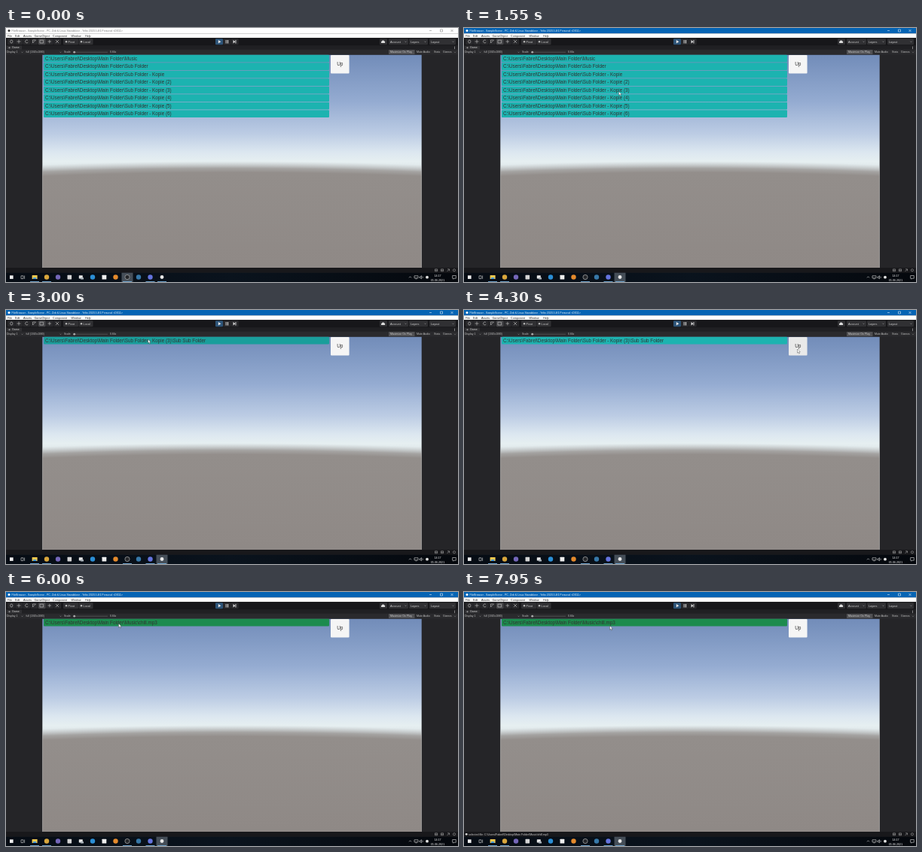
Write an HTML page that moves like this. It is 600 px wide and 338 px high and loops after 8 s.

```html
<!DOCTYPE html>
<html lang="en">
<head>
<meta charset="utf-8">
<title>File browser</title>
<style>
  html, body { margin: 0; width: 100%; height: 100%; overflow: hidden; background: #252528; }
  svg { display: block; width: 100vw; height: 100vh; }
  text { font-family: "Liberation Sans", Arial, sans-serif; white-space: pre; }
</style>
</head>
<body>
<svg id="stage" viewBox="0 0 600 338">
  <defs>
    <linearGradient id="sky" x1="0" y1="36" x2="0" y2="190" gradientUnits="userSpaceOnUse">
      <stop offset="0" stop-color="#728cb9"/>
      <stop offset=".4" stop-color="#94abd1"/>
      <stop offset=".68" stop-color="#bccce4"/>
      <stop offset=".84" stop-color="#dce7f0"/>
      <stop offset=".92" stop-color="#e6eff1"/>
      <stop offset="1" stop-color="#dbe3e5"/>
    </linearGradient>
    <radialGradient id="ground" cx="300" cy="6537" r="6360" gradientUnits="userSpaceOnUse">
      <stop offset=".9784" stop-color="#8f8986"/>
      <stop offset=".9976" stop-color="#938e8b"/>
      <stop offset=".9985" stop-color="#9b9896" stop-opacity=".85"/>
      <stop offset="1" stop-color="#b9bcbe" stop-opacity="0"/>
    </radialGradient>
    <linearGradient id="taskbar">
      <stop offset="0" stop-color="#060c14"/>
      <stop offset=".5" stop-color="#0a131d"/>
      <stop offset="1" stop-color="#05080d"/>
    </linearGradient>
  </defs>
  <g id="scene"></g>
  <g id="rows"></g>
  <g id="overlay"></g>
</svg>
<script>
const LOOP = 8000;
const scene = document.getElementById("scene");
const rowLayer = document.getElementById("rows");
const overlay = document.getElementById("overlay");

function add(tag, attrs, parent = scene) {
  const el = document.createElementNS("http://www.w3.org/2000/svg", tag);
  for (const name in attrs) el.setAttribute(name, attrs[name]);
  return parent.appendChild(el);
}
const rect = (x, y, width, height, fill, rx = 0, parent) =>
  add("rect", { x, y, width, height, fill, rx }, parent);
const circle = (cx, cy, r, fill) => add("circle", { cx, cy, r, fill });
const line = (d, stroke = "#c4c4c4", width = .6) =>
  add("path", { d, stroke, fill: "none", "stroke-width": width });
function label(x, y, content, size, fill, anchor = "start", parent) {
  const el = add("text", { x, y, fill, "font-size": size, "text-anchor": anchor }, parent);
  el.textContent = content;
  return el;
}

// Window frame and menu
const titleBar = rect(0, 0, 600, 7.3, "#fff");
const titleIcon = circle(4, 3.6, 1.5, "#333");
const title = label(7.5, 4.8, "FileBrowser - SampleScene - PC, Zeb & Linux Standalone - Yelto 2020.3.4f1 Personal <DX11>", 3.5, "#777");
const windowButtons = line("M562 3.5h3M576.5 2h3v3h-3zM590.5 2l3 3m0-3l-3 3", "#777", .5);
rect(0, 7.3, 600, 5.9, "#fff");
[["File", 2], ["Edit", 12], ["Assets", 23], ["GameObject", 37.5], ["Component", 62], ["Window", 86.5], ["Help", 105]]
  .forEach(([name, x]) => label(x, 11.6, name, 3.7, "#222"));

// Editor toolbar
rect(0, 13.2, 600, 10.3, "#17171a");
for (let i = 0; i < 7; i++) rect(2 + i * 10.2, 14.3, 9.8, 8, i === 4 ? "#454548" : "#29292c", 1);
line("M5.5 18l1-2 1.5 0 1 2-1 2h-1.5zM14.5 18h5m-2.5-2.5v5M29 16.5a2 2 0 1 0 .3 2.5M35.5 20v-4h4zM45 16.2h4.6v3.8h-4.6zM55.5 18h4.5m-2.2-2.2v4.5M66 20l4-4m-4 0l4 4");
rect(76, 14.3, 20, 8, "#303033", 1);
rect(96.5, 14.3, 19, 8, "#303033", 1);
circle(80, 18.2, 1.2, "#bbb");
circle(100, 18.2, 1.2, "#bbb");
label(82.5, 19.5, "Pivot", 3.9, "#c8c8c8");
label(102.5, 19.5, "Local", 3.9, "#c8c8c8");
rect(278, 14.3, 10, 8, "#2d5478", 1);
rect(288.3, 14.3, 10, 8, "#29292c", 1);
rect(298.6, 14.3, 10, 8, "#29292c", 1);
add("path", { d: "M281.8 16l3.6 2.2-3.6 2.2zM291.7 16h1v4.4h-1zM294 16h1v4.4h-1zM301.6 16l2.7 2.2-2.7 2.2zM304.5 16h.9v4.4h-.9z", fill: "#e5e5e5" });
rect(496, 14.3, 10, 8, "#303033", 1);
add("path", { d: "M498.5 20a1.2 1.2 0 0 1 .3-2.2 1.9 1.9 0 0 1 3.5-.2 1.3 1.3 0 0 1 .3 2.4z", fill: "#ddd" });
[["Account", 508, 26], ["Layers", 535, 25], ["Layout", 562, 35]].forEach(([name, x, w]) => {
  rect(x, 14.3, w, 8, "#303033", 1);
  label(x + 2, 19.6, name, 3.8, "#d0d0d0");
  line(`M${x + w - 4.5} 17.7l1 1 1-1`, "#bbb", .5);
});

// Game view header
rect(0, 23.5, 600, 5.2, "#202023");
rect(1, 23.7, 20, 5, "#303033");
line("M3 26.2h3m-1.5-1.2v2.4", "#bbb", .5);
label(8, 27.4, "Game", 3.6, "#d2d2d2");
line("M595.5 24.5v3.6", "#aaa", .7);
rect(0, 28.7, 600, 7, "#2a2a2d");
label(1, 33.4, "Display 1", 3.5, "#c0c0c0");
label(26.5, 33.4, "full (1920x1080)", 3.4, "#c0c0c0");
line("M20.5 31.7l1 1 1-1M71.5 31.7l1 1 1-1", "#aaa", .5);
label(77, 33.4, "Scale", 3.5, "#c0c0c0");
line("M89 32.2h46", "#737373", .5);
circle(90.7, 32.2, 1.4, "#aaa");
label(138, 33.4, "0.84x", 3.4, "#c0c0c0");
rect(508, 29, 34.5, 6, "#505053");
label(510, 33.4, "Maximize On Play", 3.6, "#d0d0d0");
label(545, 33.4, "Mute Audio", 3.6, "#c0c0c0");
label(568, 33.4, "Stats", 3.6, "#c0c0c0");
label(580, 33.4, "Gizmos", 3.5, "#c0c0c0");
line("M595 31.7l1 1 1-1", "#aaa", .5);

// Game view
rect(0, 35.6, 600, 283.6, "#252528");
rect(48.3, 35.8, 503.4, 283.2, "url(#sky)");
rect(48.3, 170, 503.4, 149, "url(#ground)");
const upButton = rect(431, 36, 24.6, 24.6, "#f5f5f5", 1);
label(443.3, 50.4, "Up", 6.5, "#323232", "middle");

// Status bar
rect(0, 319, 600, 6.8, "#18181b");
line("M569.5 320.8h3v3h-3zm0 1.5h3M577.5 320.8h3v3h-3zm0 1.5h3M586 320.8h2.5v2.5m-3 .7l3-3", "#bbb", .5);
add("circle", { cx: 595, cy: 322.3, r: 1.6, fill: "none", stroke: "#bbb", "stroke-width": .5 });

// Taskbar
rect(0, 325.7, 600, 12.3, "url(#taskbar)");
const activeTask = rect(0, 325.7, 15, 12.3, "#454e58");
rect(5, 329.3, 4.6, 4.6, "#f0f0f0");
line("M20 329.8h3v3.8h-3zM24.6 329.5v4.4", "#ddd", .6);
rect(34.6, 329, 7, 5, "#f3c94f", .5);
rect(36, 332, 4.2, 2, "#4a9bd8");
[[54, "#d9a63c"], [69, "#7466b8"], [115, "#2b8fd6"], [145.5, "#e58a2c"], [161, "#25272b"], [176, "#3778a8"], [191.5, "#6574df"]]
  .forEach(([x, color]) => circle(x, 331.5, 3.2, color));
add("circle", { cx: 161, cy: 331.5, r: 3.1, fill: "none", stroke: "#c8c8c8", "stroke-width": .6 });
rect(81.5, 328.8, 5.6, 5.6, "#d5d5d5", .6);
rect(96.8, 329.2, 5, 4.2, "#e9e9e9", .5);
rect(99, 332, 4, 2.5, "#aeb6bd", .5);
rect(127.5, 328.7, 5.8, 5.8, "#eee", .6);
circle(207, 331.5, 2.4, "#e8e8e8");
[38, 54, 161, 191.5, 207].forEach(x => rect(x - 6, 337.1, 12, .9, "#77aeda"));
line("M535 332.3l1.5-1.5 1.5 1.5M542 329.8h5v3h-5zm1.5 4h2M549 331h1l1.5-1.3v4l-1.5-1.2h-1zM552.8 330.5q1 1.2 0 2.4", "#ddd", .6);
circle(559, 331.7, 1.9, "#e4e4e4");
label(573, 330.6, "14:17", 3.7, "#eee", "middle");
label(573, 336.5, "05.06.2021", 3.7, "#eee", "middle");
line("M592.7 329.5h4.6v3.7h-2.5l-1 1v-1h-1.1z", "#ddd", .6);

// Browser contents
const ROOT = "C:\\Users\\Fabrel\\Desktop\\Main Folder\\";
const TEAL = [28, 179, 176], GREEN = [32, 158, 88];
const folders = ["Music", "Sub Folder", "Sub Folder - Kopie", ...[2, 3, 4, 5, 6].map(n => `Sub Folder - Kopie (${n})`)];
const pages = [
  { start: 0, color: TEAL, items: folders },
  { start: 2050, color: TEAL, items: ["Sub Folder - Kopie (3)\\Sub Sub Folder"] },
  { start: 4550, color: TEAL, items: folders },
  { start: 6000, color: GREEN, items: ["Music\\chill.mp3"] }
];
const rows = folders.map((_, i) => {
  const group = add("g", {}, rowLayer);
  const y = 35.8 + i * 10.5;
  return {
    group,
    box: rect(50, y, 379, 9.6, "#1cb3b0", 1, group),
    text: label(52, y + 7.1, "", 6.31, "#323232", "start", group)
  };
});

// Highlighted target (row index or "up") with its start and end
const hovers = [[1560, 2050, 4], [2750, 3550, 0], [3950, 4850, "up"], [5340, 6000, 0], [6000, 8200, 0]];
const CLICK_TIME = 7500;

const statusLine = add("g", {}, overlay);
add("circle", { cx: 3.2, cy: 322.3, r: 1.4, fill: "#ddd" }, statusLine);
label(6, 323.6, `selected file: ${ROOT}Music\\chill.mp3`, 3.6, "#d0d0d0", "start", statusLine);
const cursor = add("path", { d: "M0 0v5.2l1.2-1.1.9 2 .9-.4-.9-1.9h1.7z", fill: "#fff", stroke: "#222", "stroke-width": .35 }, overlay);

const cursorPath = [
  [350, 604, 200], [900, 330, 170], [1500, 205.5, 84.5], [2150, 205.5, 84.5],
  [2800, 188.5, 39], [3450, 188.5, 39], [4000, 442.5, 52], [4750, 442.5, 52],
  [5320, 149.5, 42], [6050, 149.5, 42], [6600, 193.5, 45], [LOOP, 193.5, 45]
];

const clamp = v => Math.max(0, Math.min(1, v));
const shade = (color, k) => `rgb(${color.map(c => Math.round(c * k))})`;

function cursorAt(t) {
  const next = Math.max(1, cursorPath.findIndex(p => p[0] > t));
  const [t0, x0, y0] = cursorPath[next - 1], [t1, x1, y1] = cursorPath[next];
  const k = clamp((t - t0) / (t1 - t0)), e = k * k * (3 - 2 * k);
  return [x0 + (x1 - x0) * e, y0 + (y1 - y0) * e];
}

function hoverAmount(target, t) {
  return Math.max(...hovers.filter(h => h[2] === target)
    .map(([start, end]) => Math.min(clamp((t - start) / 100), clamp((end + 100 - t) / 100))), 0);
}

function draw(t) {
  const focused = t >= 600;
  titleBar.setAttribute("fill", focused ? "#0564b4" : "#fff");
  title.setAttribute("fill", focused ? "#f4f8fc" : "#777");
  titleIcon.setAttribute("fill", focused ? "#fff" : "#333");
  windowButtons.setAttribute("stroke", focused ? "#fff" : "#777");
  activeTask.setAttribute("x", focused ? 199.5 : 153.5);

  const page = pages.filter(p => p.start <= t).pop();
  const press = clamp((t - CLICK_TIME + 100) / 100) * clamp((7850 - t) / 150);
  rows.forEach(({ group, box, text }, i) => {
    const item = page.items[i];
    group.setAttribute("visibility", item ? "visible" : "hidden");
    if (!item) return;
    text.textContent = ROOT + item;
    box.setAttribute("fill", shade(page.color, 1 - .12 * hoverAmount(i, t) - .1 * press));
  });
  upButton.setAttribute("fill", shade([245, 245, 245], 1 - .05 * hoverAmount("up", t)));

  statusLine.setAttribute("visibility", t >= CLICK_TIME ? "visible" : "hidden");
  cursor.setAttribute("visibility", t >= 350 ? "visible" : "hidden");
  cursor.setAttribute("transform", `translate(${cursorAt(t)})`);
}

const startTime = performance.now();
function tick() {
  draw((performance.now() - startTime) % LOOP);
  requestAnimationFrame(tick);
}
tick();
</script>
</body>
</html>
```
